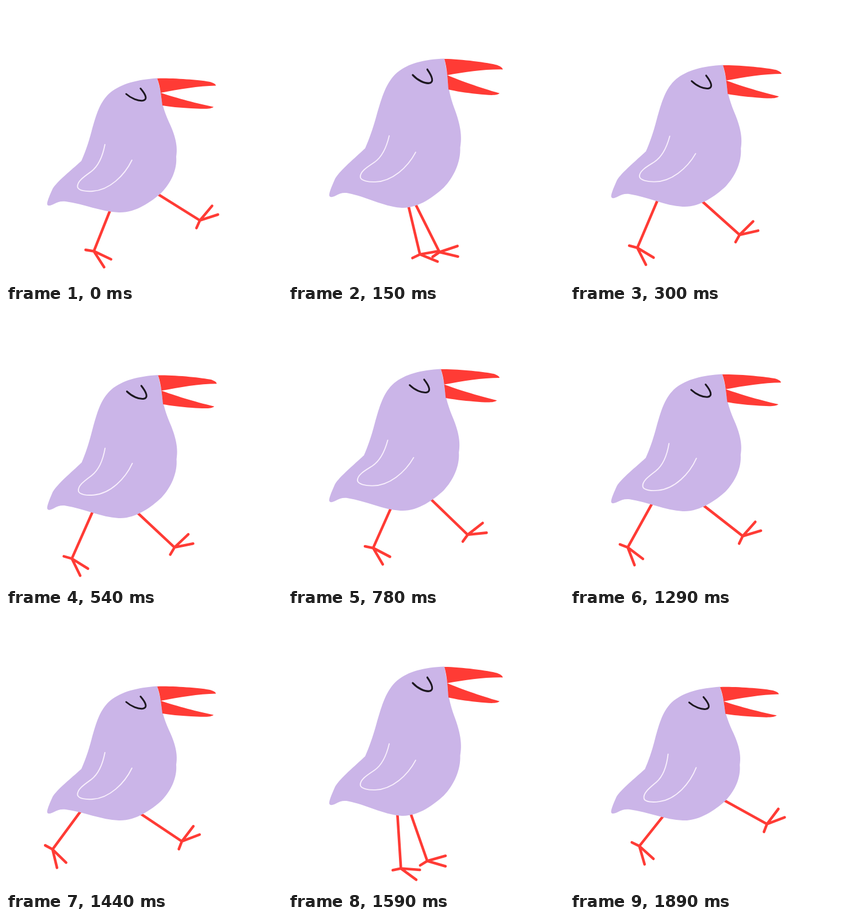
Animation of 480x480 px, one loop 1.92 s. Source, as an HTML page:

```html
<!DOCTYPE html>
<html lang="en">
<head>
<meta charset="utf-8">
<title>Walking bird</title>
<style>
  html, body { margin: 0; width: 100%; height: 100%; overflow: hidden; background: #fff; }
  svg { display: block; width: 100vw; height: 100vh; }
  path { fill: none; stroke-linecap: round; stroke-linejoin: round; }
  .leg { stroke: #ff3b35; stroke-width: 4.6; }
  .beak { fill: #ff3b35; }
</style>
</head>
<body>
<svg viewBox="0 0 480 480">
  <path id="legA" class="leg"/>
  <path id="legB" class="leg"/>
  <g id="body">
    <path fill="#cbb5e8" style="fill:#cbb5e8" d="M263 125.5C228 128 201 135 182 150C163 166 157 189 149 217C143 240 137 256 131 269.5C113 286 90 304 81 318C77 327 72 338 71.5 344C72 349 78 347 83 344.5C90 341 95 339 104 340C135 344 166 358 196 359C225 360 252 341 270 325C287 308 298 284 296 262C300 240 291 218 283 201C275 183 270 166 269 150Z"/>
    <path class="beak" d="M263 126C292 125 340 129 355 132C361 134 365 136 365 138.5C335 139 300 145 269 151Q267 137 263 126Z"/>
    <path class="beak" d="M269 151C290 158 325 168 361 175.5C356 180 340 179 322 178C302 177 284 175 272 173C271 166 270 158 269 151Z"/>
    <path stroke="#1d1820" stroke-width="3" d="M209 153C218 161 230 165.5 238 164.5C247 163 243 154 234 143.5"/>
  </g>
  <path id="wing" stroke="#f8effc" stroke-width="1.9" d="M172 241C168 262 160 279 148 288C137 296 123 305 124.5 315C126 321 139 323 151 322C180 320 206 295 219 268"/>
</svg>
<script>
const LOOP = 1920, STRIDE = 960, BOB = 480, STEP = 30;
const RAD = Math.PI / 180;
const el = id => document.getElementById(id);
const [legA, legB, body, wing] = ['legA', 'legB', 'body', 'wing'].map(el);

// Repeat the ends of a cycle so that the curve runs smoothly through the seam.
function cyclic(keys, period) {
  const shift = d => ([t, ...v]) => [t + d, ...v];
  return [...keys.slice(-2).map(shift(-period)), ...keys, ...keys.slice(0, 2).map(shift(period))];
}

// Smooth curve through keys of the form [time, value, ...].
function sample(keys, t) {
  let i = 0;
  while (i < keys.length - 2 && keys[i + 1][0] <= t) i++;
  const a = keys[i], b = keys[i + 1], span = b[0] - a[0], u = (t - a[0]) / span;
  const slope = (k, j) => {
    const p = keys[Math.max(k - 1, 0)], c = keys[k], n = keys[Math.min(k + 1, keys.length - 1)];
    if (p === c || n === c) return (n[j] - p[j]) / (n[0] - p[0]);
    const h = c[0] - p[0], g = n[0] - c[0];
    return ((c[j] - p[j]) / h * g + (n[j] - c[j]) / g * h) / (h + g);
  };
  return a.slice(1).map((v, j) => {
    j++;
    const m = slope(i, j) * span, n = slope(i + 1, j) * span, d = b[j] - v;
    return v + u * (m + u * (3 * d - 2 * m - n + u * (m + n - 2 * d)));
  });
}

// head x, head y, tail y, belly y
const bobKeys = cyclic([
  [0, 263, 126, 347, 359], [60, 264.5, 113.5, 347.5, 362], [150, 272, 92, 332, 351],
  [210, 274, 88, 328, 346], [300, 266, 103, 334, 349], [330, 265, 112, 336, 350],
  [450, 261, 127, 347, 359]
], BOB);

// centre x, centre y, tilt
const wingKeys = cyclic([
  [0, 195.5, 254.5, 29.9], [60, 196, 253.5, 29], [150, 199, 240, 32], [210, 198.5, 236, 34],
  [300, 196, 241.5, 34], [330, 196, 245, 28.4], [450, 195, 255.5, 25.6]
], BOB);

// Leg angles in degrees, 0 pointing straight down, positive forward.
const swingB = cyclic([
  [0, 58], [60, 51], [300, -23], [330, -29], [430, -41],
  [540, -23.9], [630, 3.7], [780, 46], [930, 61]
], STRIDE);
const swingA = [
  [0, -21.7], [120, 6], [300, 48.2], [430, 59], [540, 46.9], [630, 19.3], [780, -24],
  [930, -41], [1020, -39], [1120, -10], [1290, 52], [1390, 59], [1500, 46.9],
  [1590, 19.3], [1740, -24], [1890, -38.5]
];

function drawLeg(leg, hipX, hipY, length, angle, footTilt) {
  const x = hipX + length * Math.sin(angle * RAD), y = hipY + length * Math.cos(angle * RAD);
  const ray = (turn, r) => {
    const a = (footTilt - angle + turn) * RAD;
    return `M${x} ${y}l${r * Math.cos(a)} ${r * Math.sin(a)}`;
  };
  leg.setAttribute('d', `M${hipX} ${hipY}L${x} ${y}` + ray(16, 33) + ray(-16, 33) + ray(148, 14.5));
}

function draw(t) {
  const [headX, headY, tail, belly] = sample(bobKeys, t % BOB);

  // Affine map that carries tail, belly and head to their current heights.
  const m = belly - 359 - (tail - 347), n = headY - 126 - (belly - 359);
  const tilt = (233 * m + 12 * n) / 30580, stretch = (63 * m - 128 * n) / 30580;
  const lean = (headX - 263) / 221;
  const rise = tail - 347 - 72 * tilt - 347 * stretch;
  body.setAttribute('transform', `matrix(1 ${tilt} ${-lean} ${1 + stretch} ${lean * 347} ${rise})`);

  const [wx, wy, turn] = sample(wingKeys, t % BOB);
  wing.setAttribute('transform', `translate(${wx} ${wy}) rotate(${turn - 29.9}) translate(-195.5 -254.5)`);

  const [a] = sample(swingA, t), [b] = sample(swingB, t % STRIDE);
  drawLeg(legA, 200 - 0.04 * a, belly - 48.5 + 0.224 * a, 130, a, 19.5);
  drawLeg(legB, 185.2 + 0.5 * b, belly - 48.5 - 0.34 * Math.hypot(b - 16, 6), 145, b, 24);
}

function tick() {
  draw(Math.floor(performance.now() % LOOP / STEP) * STEP);
  requestAnimationFrame(tick);
}
tick();
</script>
</body>
</html>
```
